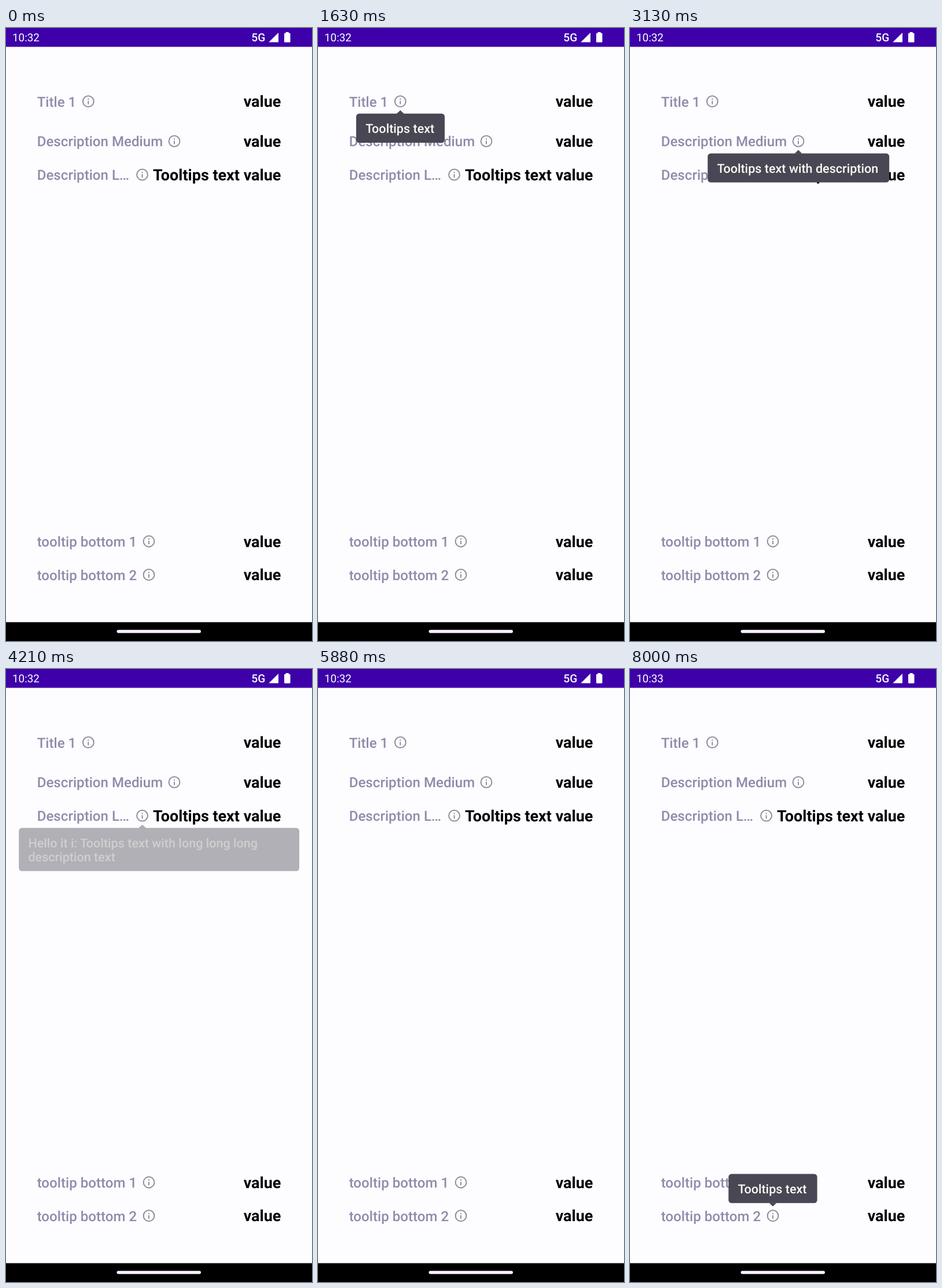
Recreate the animation shown at these times as an HTML page with a canvas. Size 529 by 1058 pixels, loop 8040 ms.

```html
<!DOCTYPE html>
<html lang="en">
<head>
<meta charset="utf-8">
<title>Tooltips</title>
<style>
html, body { margin: 0; width: 100%; height: 100%; overflow: hidden; background: #fdfcff; }
canvas { display: block; width: 529px; height: 1058px; }
</style>
</head>
<body>
<canvas id="stage"></canvas>
<script>
const W = 529, H = 1058, LOOP = 8040, FADE = 120;
const canvas = document.getElementById('stage');
const ctx = canvas.getContext('2d');
const dpr = window.devicePixelRatio || 1;
canvas.width = W * dpr;
canvas.height = H * dpr;
ctx.textRendering = 'geometricPrecision';

// label, value, baseline, icon x, icon y
const rows = [
  ['Title 1', 'value', 135.7, 142.3, 126.7],
  ['Description Medium', 'value', 204.3, 291, 195.4],
  ['Description L…', 'Tooltips text value', 262, 235.6, 253.2],
  ['tooltip bottom 1', 'value', 894.8, 247, 886],
  ['tooltip bottom 2', 'value', 952.6, 247, 943.7]
];

// bubbles: shown from / to, box, arrow x, arrow side, lines
const tips = [
  { on: 1080, off: 2280, x: 66, y: 147.8, w: 153, h: 50.2, ax: 142.3, up: true, lines: ['Tooltips text'] },
  { on: 2560, off: 3880, x: 134.3, y: 216.4, w: 313.9, h: 50.2, ax: 291, up: true, lines: ['Tooltips text with description'] },
  { on: 4160, off: 5840, x: 22.2, y: 274.2, w: 484.8, h: 74.6, ax: 235.6, up: true,
    lines: ['Hello it i: Tooltips text with long long long', 'description text'] },
  { on: 6160, off: 7260, x: 205.2, y: 813.8, w: 83.8, h: 50.2, ax: 247, up: false, lines: ['value'] },
  { on: 7500, off: 9000, x: 170.3, y: 871.6, w: 153.3, h: 50.2, ax: 247, up: false, lines: ['Tooltips text'] }
];

function text(str, x, y, size, weight, color, align = 'left') {
  ctx.font = `${weight} ${size}px Roboto, sans-serif`;
  ctx.fillStyle = color;
  ctx.textAlign = align;
  ctx.fillText(str, x, y);
}

function box(x, y, w, h, r, color) {
  ctx.fillStyle = color;
  ctx.beginPath();
  ctx.roundRect(x, y, w, h, r);
  ctx.fill();
}

function poly(points, color) {
  ctx.fillStyle = color;
  ctx.beginPath();
  points.forEach(([x, y]) => ctx.lineTo(x, y));
  ctx.fill();
}

function icon(x, y) {
  const color = '#918e9d';
  ctx.strokeStyle = color;
  ctx.lineWidth = 2;
  ctx.beginPath();
  ctx.arc(x, y, 9.4, 0, Math.PI * 2);
  ctx.stroke();
  box(x - 1, y - 5, 2, 2, 0, color);
  box(x - 1, y - 1, 2, 6, 0, color);
}

function statusBar(t) {
  box(0, 0, W, 32.4, 0, '#3e00a9');
  text(t < 7300 ? '10:32' : '10:33', 11, 23.3, 18.86, 400, '#fff');
  text('5G', 424.3, 22.7, 19.2, 500, '#fff');
  poly([[454.3, 24.6], [471, 24.6], [471, 8]], '#fff');
  box(481, 8.8, 10.5, 15.9, 1.3, '#fff');
  box(483.7, 7, 5, 3, 0.5, '#fff');
}

function navBar() {
  box(0, 1025.6, W, 33, 0, '#000');
  box(191.5, 1038.7, 145.5, 5.6, 2.8, '#f7effc');
}

function drawTip(tip, t) {
  const fadeIn = (t - tip.on) / FADE, fadeOut = (tip.off - t) / FADE;
  const alpha = Math.max(0, Math.min(1, fadeIn, fadeOut));
  if (!alpha) return;
  const { x, y, w, h, ax, up, lines } = tip;
  const edge = up ? y + 0.3 : y + h - 0.3;
  const apex = up ? y - 5.8 : y + h + 5.8;
  ctx.globalAlpha = alpha;
  box(x, y, w, h, 5.2, '#484753');
  poly([[ax - 6.4, edge], [ax, apex], [ax + 6.4, edge]], '#484753');
  lines.forEach((line, i) => text(line, x + 16.2, y + 33.5 + i * 24.4, 21.55, 500, '#fbfbf4'));
  ctx.globalAlpha = 1;
}

function draw(t) {
  ctx.setTransform(dpr, 0, 0, dpr, 0, 0);
  box(0, 0, W, H, 0, '#fdfcff');
  statusBar(t);
  for (const [label, value, y, ix, iy] of rows) {
    text(label, 53.7, y, 24.1, 500, '#8e8caa');
    text(value, 475.3, y + 0.7, 26.94, 600, '#000', 'right');
    icon(ix, iy);
  }
  tips.forEach(tip => drawTip(tip, t));
  navBar();
}

const start = performance.now();
function frame() {
  draw((performance.now() - start) % LOOP);
  requestAnimationFrame(frame);
}
frame();
</script>
</body>
</html>
```
